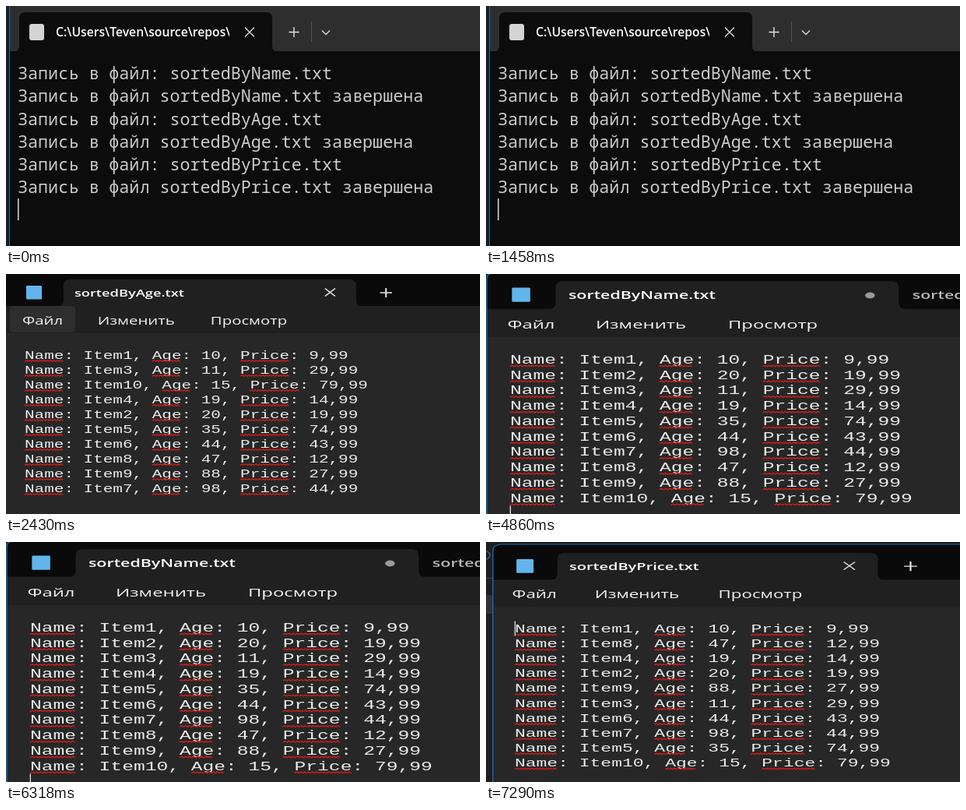
Animation, 609 px wide and 308 px high, one loop 9720 ms. Source, as an HTML page with a canvas:

```html
<!DOCTYPE html>
<html lang="ru">
<head>
<meta charset="utf-8">
<style>
html, body { margin: 0; width: 100%; height: 100%; overflow: hidden; background: #0c0c0c; }
canvas { display: block; }
</style>
</head>
<body>
<canvas id="stage" width="609" height="308"></canvas>
<script>
const ctx = document.getElementById('stage').getContext('2d');
const SLIDE_MS = 2430;
const UI = '"Open Sans", "Noto Sans", sans-serif';
const EDGE = '#1a6cb0';

const items = [
  [1, 10, 9.99], [2, 20, 19.99], [3, 11, 29.99], [4, 19, 14.99], [5, 35, 74.99],
  [6, 44, 43.99], [7, 98, 44.99], [8, 47, 12.99], [9, 88, 27.99], [10, 15, 79.99]
];

function rect(x, y, w, h, color, r = 0) {
  ctx.fillStyle = color;
  ctx.beginPath();
  ctx.roundRect(x, y, w, h, r);
  ctx.fill();
}

function text(str, x, y, font, color) {
  ctx.font = font;
  ctx.fillStyle = color;
  ctx.fillText(str, x, y);
}

// Each polyline is a flat list: x0, y0, x1, y1, ...
function lines(color, width, ...paths) {
  ctx.strokeStyle = color;
  ctx.lineWidth = width;
  ctx.beginPath();
  for (const p of paths) {
    ctx.moveTo(p[0], p[1]);
    for (let i = 2; i < p.length; i += 2) ctx.lineTo(p[i], p[i + 1]);
  }
  ctx.stroke();
}

function cross(x, y, rx, ry, color) {
  lines(color, 1.2, [x - rx, y - ry, x + rx, y + ry], [x - rx, y + ry, x + rx, y - ry]);
}

function plus(x, y, rx, ry, color) {
  lines(color, 1.4, [x - rx, y, x + rx, y], [x, y - ry, x, y + ry]);
}

// Tab with rounded top corners and flared feet
function tab(left, right, top, bottom, rx, ry, color) {
  ctx.fillStyle = color;
  ctx.beginPath();
  ctx.moveTo(left - rx, bottom);
  ctx.quadraticCurveTo(left, bottom, left, bottom - ry);
  ctx.lineTo(left, top + ry);
  ctx.quadraticCurveTo(left, top, left + rx, top);
  ctx.lineTo(right - rx, top);
  ctx.quadraticCurveTo(right, top, right, top + ry);
  ctx.lineTo(right, bottom - ry);
  ctx.quadraticCurveTo(right, bottom, right + rx, bottom);
  ctx.fill();
}

function terminal() {
  rect(0, 0, 609, 308, '#1b1c1f');
  rect(5, -8, 620, 330, '#2e2e2e', 8);
  rect(5, 58, 604, 250, '#0c0c0c');
  tab(17, 342, 8, 59, 8, 8, '#0c0c0c');
  lines(EDGE, 1, [4.5, 0, 4.5, 308]);
  rect(30, 23, 19, 21, '#d4d4d4', 3);

  ctx.save();
  ctx.beginPath();
  ctx.rect(60, 10, 227, 45);
  ctx.clip();
  text('C:\\Users\\Teven\\source\\repos\\', 64, 39, '600 15.7px ' + UI, '#ffffff');
  ctx.restore();

  cross(313, 33.5, 6, 6, '#e6e6e6');
  plus(370, 33.5, 6.5, 6.5, '#e6e6e6');
  lines('#555555', 1, [392.5, 20, 392.5, 46]);
  lines('#d8d8d8', 1.4, [406, 31.5, 411, 36.5, 416, 31.5]);

  const font = '500 21.73px "Noto Sans Mono", "DejaVu Sans Mono", monospace';
  ['Name', 'Age', 'Price'].forEach((key, i) => {
    const file = `sortedBy${key}.txt`;
    const y = 94 + i * 58.5;
    text('Запись в файл: ' + file, 15, y, font, '#cccccc');
    text(`Запись в файл ${file} завершена`, 15, y + 29.2, font, '#cccccc');
  });
  rect(15, 247, 1.5, 28, '#d8d8d8');
}

function squiggle(x, y, w) {
  const path = [];
  for (let i = 0; i * 1.6 <= w; i++) path.push(x + i * 1.6, y + (i % 2 ? -0.7 : 0.7));
  lines('#d81a1a', 1.2, path);
}

function row([id, age, price], y) {
  const left = 17.2;
  const str = `Name: Item${id}, Age: ${age}, Price: ${price.toFixed(2).replace('.', ',')}`;
  text(str, left, y, '15.06px "Liberation Mono", "DejaVu Sans Mono", monospace', '#ececec');
  const step = ctx.measureText('0').width;
  for (const word of ['Name', 'Age', 'Price']) {
    squiggle(left + str.indexOf(word) * step, y + 3, word.length * step);
  }
}

function notepad({ key, col, sx, sy, dx, dy, caret, hover, unsaved, nextTab }) {
  rect(0, 0, 609, 308, '#1d1e21');
  if (dx > 5) {
    rect(0, 46, 9, 1, '#45474c');
    rect(0, 68, 9, 24, '#303238');
    ctx.strokeStyle = '#4b6f95';
    ctx.lineWidth = 1.2;
    ctx.beginPath();
    ctx.arc(0, 17, 5, -1.6, 1.6);
    ctx.stroke();
  }
  ctx.save();
  ctx.transform(sx, 0, 0, sy, dx, dy);

  rect(-1, -4, 700, 400, '#0a0a0b', 7);
  rect(-1, 41, 700, 36, '#202020');
  rect(-1, 76, 700, 320, '#272727');
  ctx.strokeStyle = EDGE;
  ctx.lineWidth = 0.9;
  ctx.beginPath();
  ctx.roundRect(-1.2, -4, 700, 400, 7);
  ctx.stroke();

  tab(53, 322.5, 7, 41.5, 6, 8, '#202020');
  rect(18.6, 15, 14.4, 17.5, '#62b5ea', 1);
  const title = '600 13.1px ' + UI;
  text(`sortedBy${key}.txt`, 63, 29, title, '#ffffff');

  if (unsaved) {
    ctx.fillStyle = '#9a9a9a';
    ctx.beginPath();
    ctx.arc(300, 24.5, 3.8, 0, 7);
    ctx.fill();
  } else {
    cross(298.5, 23.5, 4.7, 5, '#e0e0e0');
  }
  if (nextTab) text(nextTab, 333.3, 29, title, '#b8b8b8');
  else plus(350, 24, 5.5, 6, '#e8e8e8');

  if (hover) rect(3.6, 41, 60.2, 34, '#2e2e2e', 4);
  const menu = '500 14.6px ' + UI;
  text('Файл', 15, 65, menu, '#f2f2f2');
  text('Изменить', 84.4, 65, menu, '#f2f2f2');
  text('Просмотр', 188.4, 65, menu, '#f2f2f2');

  [...items].sort((a, b) => a[col] - b[col]).forEach((item, i) => row(item, 108.5 + i * 19));
  if (caret >= 0) rect(17, 94 + caret * 19, 0.8, 19, '#e6e6e6');
  ctx.restore();
}

const slides = [
  terminal,
  () => notepad({ key: 'Age', col: 1, sx: 1.395, sy: 1, dx: 0, dy: 0, caret: -1, hover: true }),
  () => notepad({ key: 'Name', col: 0, sx: 1.635, sy: 1.04, dx: 2.9, dy: 2, caret: 10,
                  unsaved: true, nextTab: 'sortedByAge.txt' }),
  () => notepad({ key: 'Price', col: 2, sx: 1.528, sy: 1.005, dx: 10.7, dy: 7, caret: 0 })
];

function draw() {
  slides[Math.floor(performance.now() / SLIDE_MS) % slides.length]();
  requestAnimationFrame(draw);
}
draw();
</script>
</body>
</html>
```
